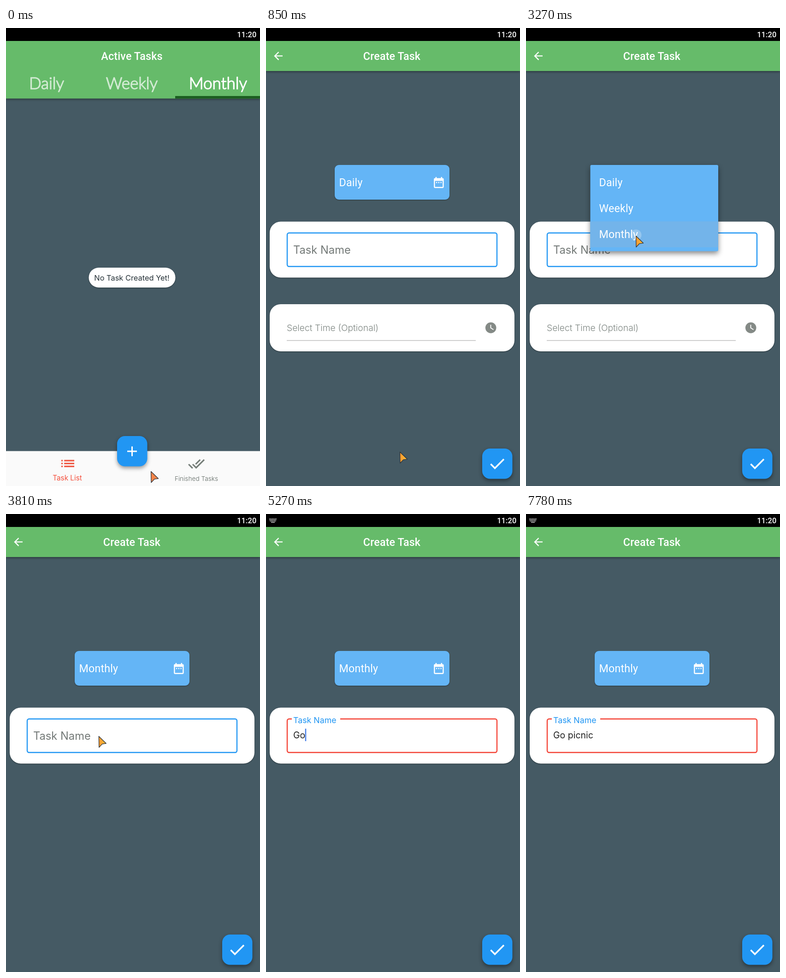
An HTML page that plays this animation: 551 px wide and 990 px high, repeating every 8000 ms.

```html
<!DOCTYPE html>
<html lang="en">
<head>
<meta charset="utf-8">
<title>Create Task</title>
<style>
  html, body { margin: 0; width: 100%; height: 100%; overflow: hidden; background: #455a64; }
  svg { display: block; width: 100%; height: 100%; }
  text { font-family: Inter, "Open Sans", sans-serif; white-space: pre; }
  .mid { text-anchor: middle; }
  .ui { font-family: Roboto, sans-serif; font-size: 23.3px; fill: #fff; letter-spacing: .15px; }
  .bold { font-weight: 500; }
  .tab { font: 300 35px Lato, sans-serif; fill: #fff; stroke: #fff; stroke-width: 1.5; stroke-linejoin: round; text-anchor: middle; }
  .bar { filter: drop-shadow(0 2px 2px #0006); }
  .card { filter: drop-shadow(0 1px 1px #0006); }
  .raised { filter: drop-shadow(0 4px 4px #0006); }
  .menu { filter: drop-shadow(0 5px 6px #0007); }
</style>
</head>
<body>
<svg viewBox="0 0 551 990" preserveAspectRatio="none">
  <defs>
    <linearGradient id="amber">
      <stop offset="0" stop-color="#f7982f"/>
      <stop offset=".7" stop-color="#fbb436"/>
    </linearGradient>
  </defs>
  <rect width="551" height="990" fill="#455a64"/>

  <g id="list">
    <rect class="bar" y="28" width="551" height="124.500" fill="#66bb6a"/>
    <text class="ui bold mid" x="273" y="69">Active Tasks</text>
    <text class="tab" x="88" y="132" opacity=".7">Daily</text>
    <text class="tab" x="273" y="132" opacity=".7">Weekly</text>
    <text class="tab" x="460" y="132">Monthly</text>
    <rect x="367" y="147" width="184" height="5.500" fill="#1b5e20"/>
    <rect class="card" x="179.500" y="518" width="188" height="43" rx="21.500" fill="#fff"/>
    <text class="mid" x="273" y="545.500" font-size="16.400" fill="#263238">No Task Created Yet!</text>
    <rect y="914.500" width="551" height="76" fill="#fafafa"/>
    <path transform="translate(115.300 922.700) scale(1.560)" fill="#ef5a45"
      d="M3 7h2v2H3zM3 11h2v2H3zM3 15h2v2H3zM7 7h14v2H7zM7 11h14v2H7zM7 15h14v2H7z"/>
    <text class="mid" x="133" y="978" font-size="15.300" fill="#f4513e">Task List</text>
    <path transform="translate(394.400 923.300) scale(1.550)" fill="#757d78"
      d="M18 7l-1.410-1.410-6.340 6.340 1.410 1.410zM22.240 5.590L11.660 16.170 7.480 12l-1.410 1.410L11.660 19l12-12zM.410 13.410L6 19l1.410-1.410L1.830 12z"/>
    <text class="mid" x="413" y="979" font-size="13.700" font-weight="300" fill="#5f6863">Finished Tasks</text>
  </g>

  <g id="form">
    <rect y="28" width="551" height="962" fill="#455a64"/>
    <rect class="bar" y="28" width="551" height="65" fill="#66bb6a"/>
    <path transform="translate(12.700 46.500) scale(1.163)" fill="#fff"
      d="M20 11H7.830l5.590-5.590L12 4l-8 8 8 8 1.410-1.410L7.830 13H20z"/>
    <text class="ui bold mid" x="273" y="69">Create Task</text>
    <rect class="card" x="149" y="296" width="249" height="75" rx="9" fill="#64b5f6"/>
    <text id="choice" class="ui" x="158.500" y="342">Daily</text>
    <path transform="translate(360.600 319.700) scale(1.190)" fill="#fff" fill-rule="evenodd"
      d="M7 11h2v2H7zM11 11h2v2h-2zM15 11h2v2h-2zM19 4h-1V2h-2v2H8V2H6v2H5a2 2 0 0 0-2 2v14a2 2 0 0 0 2 2h14a2 2 0 0 0 2-2V6a2 2 0 0 0-2-2zM5 9h14v11H5z"/>
    <rect class="card" x="8" y="418.500" width="531" height="121" rx="24" fill="#fff"/>
    <rect id="field" x="46" y="443" width="455" height="72.500" rx="4" fill="none" stroke-width="2.400"/>
    <rect id="gap" x="56" y="440" height="6" fill="#fff"/>
    <text id="label" x="59">Task Name</text>
    <text id="typed" x="59" y="485" font-size="19.500" fill="#212121"></text>
    <rect id="caret" y="464" width="2.500" height="27" fill="#4a80e8"/>
    <g id="timeCard">
      <rect class="card" x="8" y="597" width="531" height="102" rx="24" fill="#fff"/>
      <text x="45" y="655" font-size="19.300" font-weight="300" fill="#7d8581">Select Time (Optional)</text>
      <path d="M45 675.500H455" stroke="#bdbdbd" stroke-width="1.500"/>
      <circle cx="487.700" cy="648" r="11.800" fill="#848a86"/>
      <path d="M487.500 641.500v6.800l6 3.700" fill="none" stroke="#fff" stroke-width="1.900"/>
    </g>
    <g id="menu">
      <rect id="sheet" class="menu" x="139.500" width="277.500" rx="3" fill="#64b5f6"/>
      <rect id="pressed" x="139.500" y="418" width="277.500" height="56" fill="#73b4ea"/>
      <text class="ui" x="158.500" y="342">Daily</text>
      <g id="more">
        <text class="ui" x="158.500" y="398">Weekly</text>
        <text class="ui" x="158.500" y="454">Monthly</text>
      </g>
    </g>
  </g>

  <g id="fab">
    <rect class="raised" width="65.500" height="65.500" rx="17" fill="#2196f3"/>
    <path id="plus" d="M22 33h21M32.500 22.500v21" stroke="#fff" stroke-width="3"/>
    <path id="tick" d="M18.500 33.500l9 9 19.500-19.500" fill="none" stroke="#fff" stroke-width="3.500"/>
  </g>

  <rect width="551" height="28"/>
  <text class="ui bold" x="543.500" y="20" text-anchor="end" style="font-size:16.400px">11:20</text>
  <g id="keys" stroke="#aaa" stroke-width="1.800" stroke-dasharray="1.700 .700">
    <path d="M7 10.500h16M7.500 13h15M8.500 15.500h13"/>
    <path d="M11 18h8" stroke-dasharray="none"/>
  </g>

  <g id="pointer">
    <circle id="touch" cx=".500" cy="-1.500" r="12" fill="#fff" opacity=".25"/>
    <path id="arrow" d="M.500.500L16.500 16 8 17.200 1 24.500z" stroke="#26303a" stroke-width="1.200" stroke-linejoin="round"/>
  </g>
</svg>
<script>
const LOOP = 8000;
const el = {};
document.querySelectorAll('[id]').forEach(e => el[e.id] = e);

const show = (e, on) => e.style.display = on ? '' : 'none';
const set = (e, attrs) => { for (const k in attrs) e.setAttribute(k, attrs[k]); };
const mix = (a, b, p) => a + (b - a) * p;
const within = (t, ...spans) => spans.some(([a, b]) => t >= a && t < b);

// Progress in n equal jumps: the first at time a, the last at time b.
function jumps(t, a, b, n) {
  const k = Math.floor((t - a) / (b - a) * (n - 1) + 1.05);
  return Math.max(0, Math.min(n, k)) / n;
}

// start, end, jumps, target x, target y, bend x, bend y
const moves = [
  [90, 470, 6, 290, 916, 0, 0],
  [1100, 1870, 11, 298, 335, 75, 0],
  [2570, 3190, 9, 238, 449, 0, 0],
  [3650, 3960, 5, 176, 487, 0, 17],
  [4190, 4270, 2, 169, 487, 0, 0],
  [4420, 4580, 3, 156, 481, 0, 0]
];

function pointerAt(t) {
  let x = 314, y = 958;
  for (const [a, b, n, tx, ty, bx, by] of moves) {
    const p = jumps(t, a, b, n), bow = 2 * p * (1 - p);
    x = mix(x, tx, p) + bx * bow;
    y = mix(y, ty, p) + by * bow;
  }
  return [x, y];
}

const words = 'Go picnic';
const keyTimes = [5116, 5270, 5450, 5680, 6450, 6850, 7000, 7150, 7320];

function drawForm(t) {
  const open = jumps(t, 700, 930, 4), fade = Math.min(1, open / .75);
  show(el.form, open > 0);
  set(el.form, { opacity: fade, transform: `translate(0 ${240 * (1 - fade) ** 2})` });
  set(el.fab, { transform: `translate(${mix(241, 469, fade)} ${mix(882, 909, fade)})` });
  show(el.plus, fade < .5);
  show(el.tick, fade >= .5);

  el.choice.textContent = t < 3350 ? 'Daily' : 'Monthly';
  show(el.timeCard, t < 3350);

  const full = t >= 2260;
  show(el.menu, within(t, [2180, 3420]));
  set(el.menu, { opacity: t < 3350 ? 1 : .5 });
  set(el.sheet, { y: full ? 296 : 300.5, height: full ? 186.5 : 128.5 });
  show(el.more, full);
  show(el.pressed, t >= 3190);
}

function drawField(t) {
  const focused = t >= 4807, lift = jumps(t, 4807, 4961, 3);
  set(el.field, { stroke: focused ? '#f44336' : '#2196f3' });
  set(el.gap, { width: 105 * lift });
  set(el.label, {
    y: mix(488, 452, lift),
    'font-size': mix(23.7, 17.8, lift),
    fill: focused ? '#2196f3' : '#737977'
  });
  el.typed.textContent = words.slice(0, keyTimes.filter(k => t >= k).length);
  show(el.caret, within(t, [4884, 6140], [6450, 7780]));
  set(el.caret, { x: 58.5 + el.typed.getComputedTextLength() });
  show(el.keys, t >= 4961);
}

function drawPointer(t) {
  show(el.pointer, t < 5039);
  set(el.pointer, { transform: `translate(${pointerAt(t)})` });
  set(el.arrow, { fill: t < 700 ? '#f5854a' : 'url(#amber)' });
  show(el.touch, within(t, [470, 700], [1870, 2180], [3190, 3350], [4730, 4884]));
}

function frame() {
  const t = performance.now() % LOOP;
  drawForm(t);
  drawField(t);
  drawPointer(t);
  requestAnimationFrame(frame);
}
frame();
</script>
</body>
</html>
```
